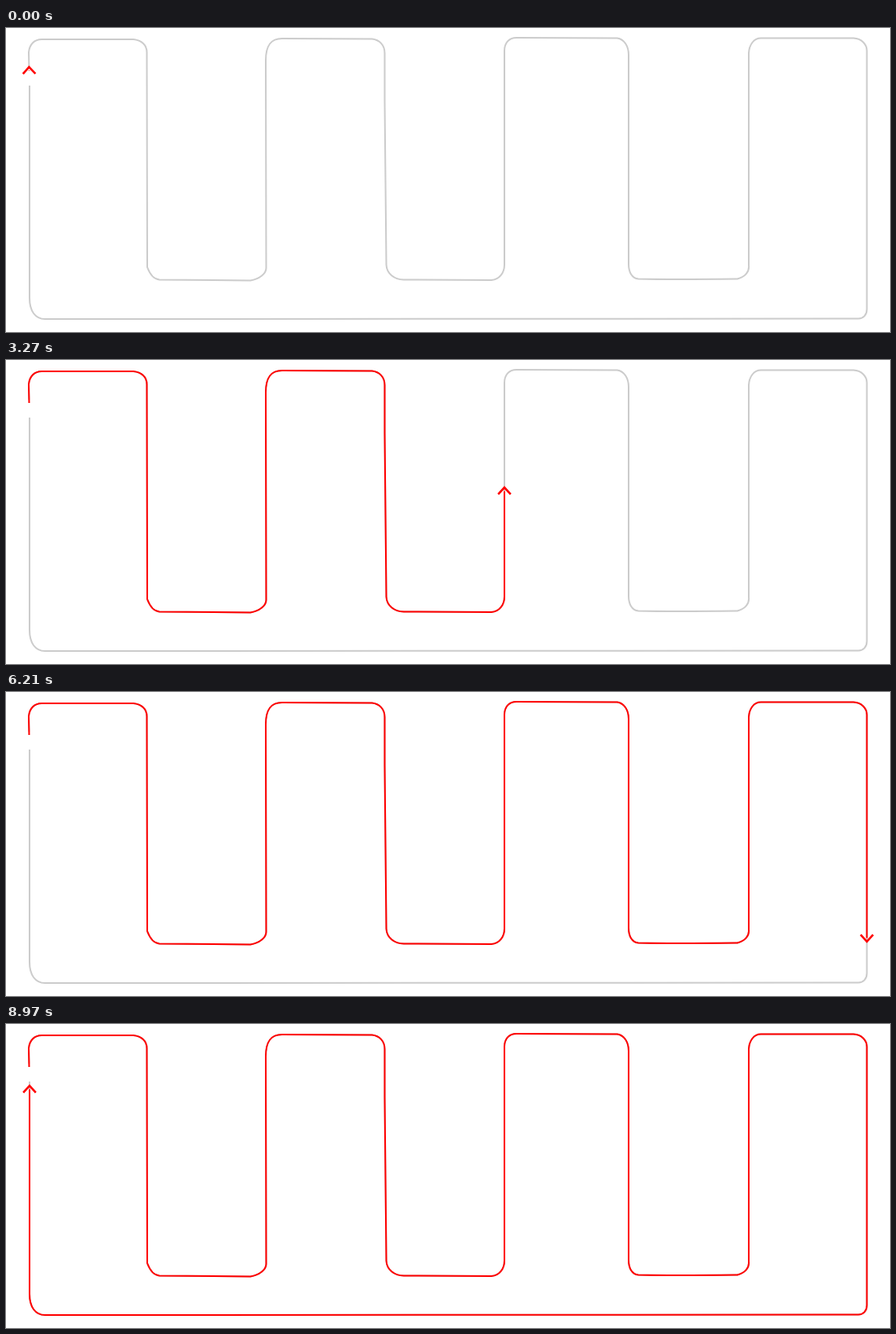
An HTML page for the animation above (9000 ms loop, 1089 px wide and 375 px high).

```html
<!DOCTYPE html>
<html lang="en">
<head>
<meta charset="utf-8">
<title>Arrow along a winding path</title>
<style>
  html, body { margin: 0; width: 100%; height: 100%; overflow: hidden; background: #fff; }
  svg { display: block; width: 1089px; height: 375px; }

  :root {
    --route: path("M28.5 53 L28 30 C29 20 35 14 44 14 L157 14 C167 15 173.5 21 173.5 30 L174 295 C177 303 182 310 189 310.5 L301 311.5 C312 310 320.5 303 320.5 296 L320 40 C320 22 326 13 340 13 L451 13.5 C460 14.5 466.5 21 466.5 31 L466.5 90 L468.5 292 C469 303 478 310 490 310.5 L598 311 C608 310 614 302 614 292 V28 C614 19 619 12 629 12 L753 12.5 C762 14 767 23 767 33 V291 C767 301 771 309 779 309.5 C820 310.5 860 310 901 309.5 C910 307 916 301 915 293 V31 C915.5 21 921 12.5 930 12.5 H1044 C1054 13 1060.5 20 1060.5 28 V347 C1060.5 354 1056 358.5 1050 358.5 L48 359 C36 359 29 349 29 333 V66.4");
  }

  path { fill: none; stroke-width: 2; }
  .rail, .trail { d: var(--route); }

  /* the rail leaves a short gap at both ends */
  .rail { stroke: #ccc; stroke-dasharray: 0 4 4374.4 100; }

  .trail {
    stroke: #f00;
    stroke-dasharray: 4383 5000;
    animation: draw 9s linear infinite;
  }

  .head {
    stroke: #f00;
    stroke-width: 2.6;
    offset-path: var(--route);
    offset-rotate: auto;
    animation: travel 9s linear infinite;
  }

  @keyframes draw {
    from { stroke-dashoffset: 4383; }
    to { stroke-dashoffset: 0; }
  }
  @keyframes travel {
    from { offset-distance: 0%; }
    to { offset-distance: 100%; }
  }
</style>
</head>
<body>
<svg viewBox="0 0 1089 375">
  <path class="rail" pathLength="4383"/>
  <path class="trail" pathLength="4383"/>
  <path class="head" d="M-4 -7.7 L4.4 0 L-4 7.7"/>
</svg>
</body>
</html>
```
